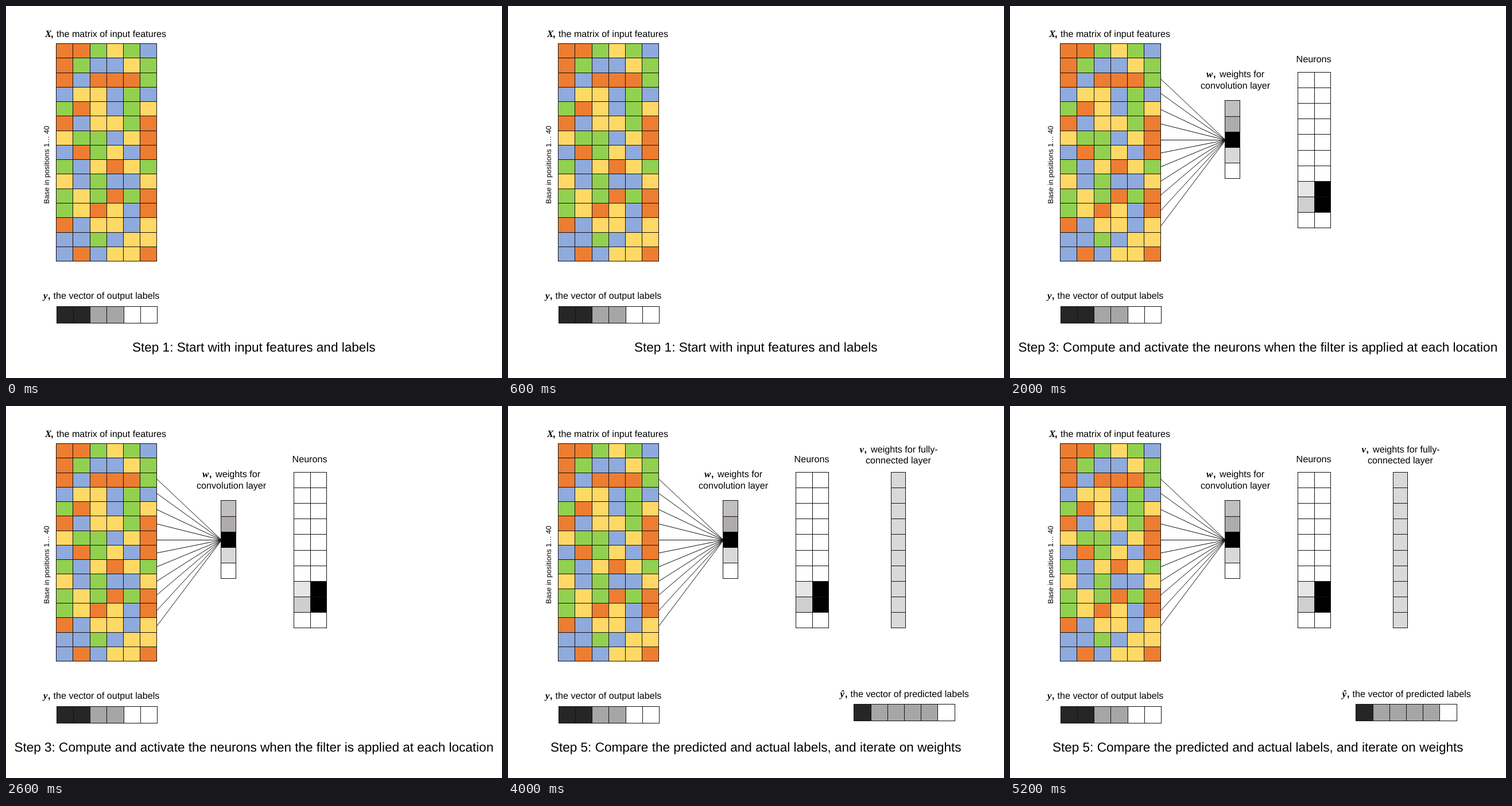
An HTML page that plays this animation: 864x648 px, repeating every 6 s.

```html
<!DOCTYPE html>
<html lang="en">
<head>
<meta charset="utf-8">
<title>Convolution in five steps</title>
<style>
  html, body { margin: 0; width: 100%; height: 100%; overflow: hidden; background: #fff; }
  svg { display: block; width: 864px; height: 648px; }
  text { font: 16.15px "Liberation Sans", Arial, sans-serif; font-kerning: none; text-rendering: geometricPrecision; }
  .math { font: italic bold 17px "Liberation Serif", "Times New Roman", serif; }
  .comma { font-weight: bold; }
  .side { font-size: 12.6px; }
  #caption { font-size: 22.55px; text-anchor: middle; }
  path { stroke: #111; fill: none; }
</style>
</head>
<body>
<svg viewBox="0 0 864 648">
  <g id="inputs">
    <text class="side" transform="translate(74.5 344.5) rotate(-90)">Base in positions 1… 40</text>
  </g>
  <g id="filter"><text x="332" y="144">convolution layer</text></g>
  <g id="neurons"><text x="498.5" y="98">Neurons</text></g>
  <g id="output"><text x="623" y="99.5">connected layer</text></g>
  <text id="caption" x="431.8" y="602"></text>
</svg>
<script>
const $ = id => document.getElementById(id);
const layers = ['inputs', 'filter', 'neurons', 'output'].map($);
const [inputs, filter, neurons, output] = layers;

const captions = [
  'Start with input features and labels',
  'Choose a convolution “filter” of the appropriate size',
  'Compute and activate the neurons when the filter is applied at each location',
  'Have a fully connected layer to calculate predictions',
  'Compare the predicted and actual labels, and iterate on weights'
];

const colors = {
  O: '#ed7d31', G: '#92d050', Y: '#ffd966', B: '#8faadc',
  k: '#000', d: '#262626', m: '#a6a6a6', t: '#afabab', s: '#bfbfbf',
  c: '#d0cece', l: '#d9d9d9', e: '#e7e6e6', w: '#fff'
};

function add(parent, tag, attrs, text = '') {
  const el = document.createElementNS('http://www.w3.org/2000/svg', tag);
  for (const key in attrs) el.setAttribute(key, attrs[key]);
  el.textContent = text;
  parent.append(el);
}

// Each word of `rows` is one row; each letter is a cell colour.
function grid(parent, x, y, w, h, rows) {
  const cells = rows.split(' ');
  const cols = cells[0].length;
  const px = i => Math.round(x + i * w) + .5;
  const py = j => Math.round(y + j * h) + .5;
  cells.forEach((row, j) => [...row].forEach((c, i) => add(parent, 'rect', {
    x: px(i), y: py(j), width: px(i + 1) - px(i), height: py(j + 1) - py(j), fill: colors[c]
  })));
  let d = '';
  for (let i = 0; i <= cols; i++) d += `M${px(i)} ${py(0) - .5}V${py(cells.length) + .5}`;
  for (let j = 0; j <= cells.length; j++) d += `M${px(0) - .5} ${py(j)}H${px(cols) + .5}`;
  add(parent, 'path', { d });
}

function label(parent, symbol, x, commaX, textX, y, text) {
  add(parent, 'text', { x, y, class: 'math' }, symbol);
  add(parent, 'text', { x: commaX, y, class: 'comma' }, ',');
  add(parent, 'text', { x: textX, y }, text);
}

label(inputs, 'X', 68, 78, 88, 54, 'the matrix of input features');
grid(inputs, 87.1, 65, 29.2, 25.27,
  'OOGYGB OGBBYG OBOOOG BYYBGB GOYBGY OBYYGO YGGBYO BOGYBO ' +
  'GBYOYG YBGBBY GYGOGO GYOYBO OBYYBY BBGBYY BOBYYO');
label(inputs, 'y', 65, 73, 82.5, 510, 'the vector of output labels');
grid(inputs, 87.8, 523, 29.2, 29, 'ddmmww');

label(filter, 'w', 342, 354, 365, 124, 'weights for');
grid(filter, 374.4, 164.4, 26, 27.2, 's t k l w');

grid(neurons, 500.8, 114.8, 28.7, 27.15, 'ww ww ww ww ww ww ww ek ck ww');
const taps = [127.5, 152.5, 180.5, 205.5, 233.5, 256, 280, 305, 329, 356, 383];
add(neurons, 'path', { d: taps.map(y => `M263 ${y}L375.5 233.5`).join('') });

label(output, 'v', 612.5, 620.5, 632, 80.5, 'weights for fully-');
grid(output, 666.6, 114.8, 25.8, 27.15, 'l l l l l l l l l l');
label(output, 'ŷ', 578.5, 587, 596.5, 506.5, 'the vector of predicted labels');
grid(output, 602.4, 519.4, 29.2, 29, 'dmmmmw');

let shown = -1;
function draw(now) {
  const step = Math.min(4, Math.floor(now % 6000 / 1000));
  if (step !== shown) {
    layers.forEach((g, i) => g.style.display = i <= step ? '' : 'none');
    $('caption').textContent = `Step ${step + 1}: ${captions[step]}`;
    shown = step;
  }
}

const start = performance.now();
function tick() {
  draw(performance.now() - start);
  requestAnimationFrame(tick);
}
tick();
</script>
</body>
</html>
```
